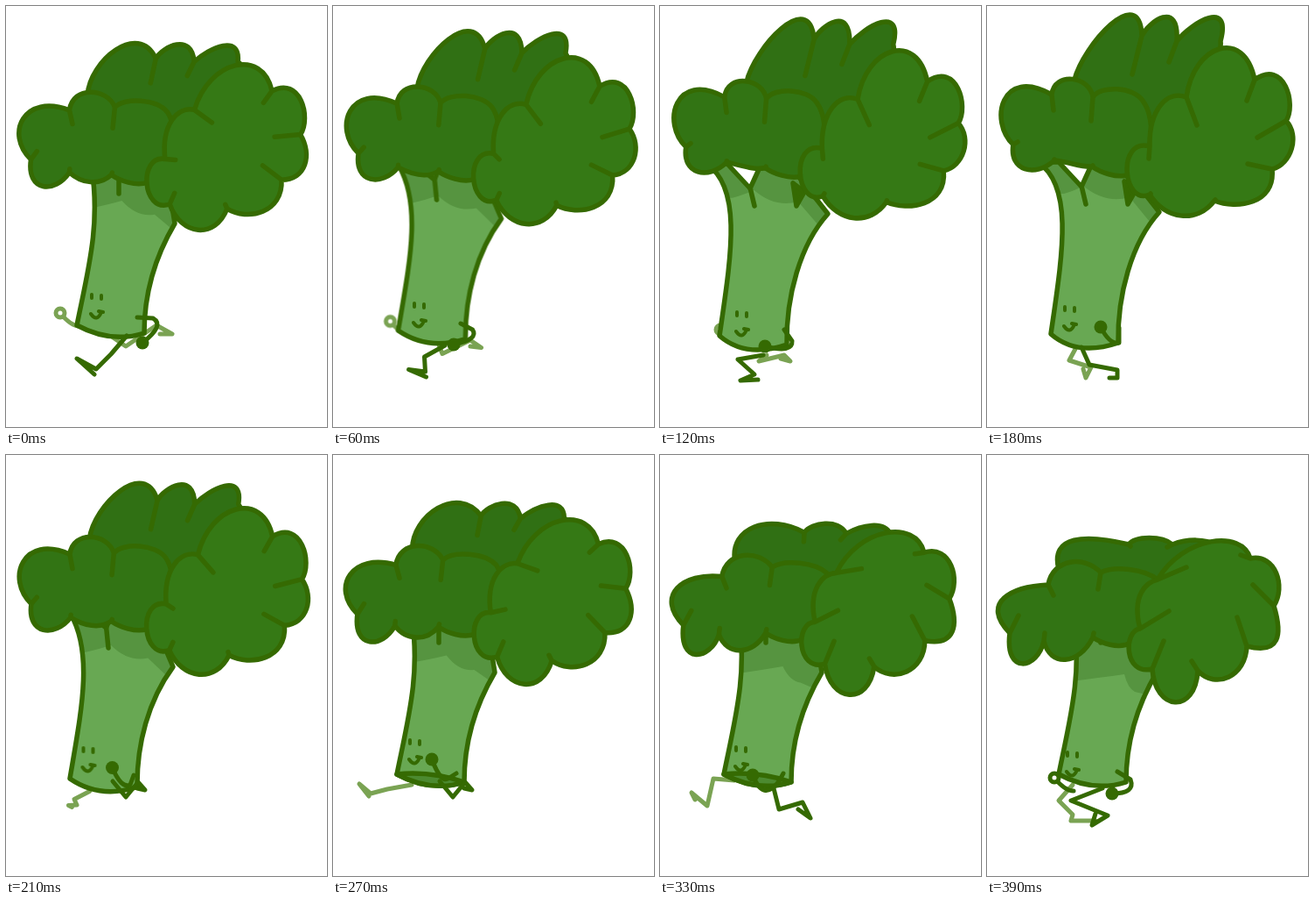
Animation of 367x480 px, one loop 0.42 s. Source, as an HTML page without scripts:

```html
<!DOCTYPE html>
<html lang="en">
<head>
<meta charset="utf-8">
<title>Running broccoli</title>
<style>
html, body { margin: 0; width: 100%; height: 100%; overflow: hidden; background: #fff; }
svg {
  display: block; width: 367px; height: 480px;
  /* How far the crown has dropped in each beat of the run: 0 up, 1 down. */
  --bounce: linear(.38 0% 14.2857%, .22 14.2857% 28.5714%, .06 28.5714% 42.8571%, 0 42.8571% 50%,
    .26 50% 64.2857%, .52 64.2857% 78.5714%, .8 78.5714% 92.8571%, 1 92.8571% 100%);
  /* How far the branches are pulled together: 0 spread, 1 closed. */
  --close: linear(1 0% 14.2857%, .5 14.2857% 28.5714%, 0 28.5714% 50%, .5 50% 64.2857%, 1 64.2857% 100%);
}
path {
  fill: none; stroke: #356a02; stroke-width: 5.5;
  stroke-linecap: round; stroke-linejoin: round;
}
path, .body { animation: 420ms step-end infinite; }

.crown path { animation-timing-function: var(--bounce); }
.back { animation-name: back; fill: #307014; }
.left { animation-name: left; fill: #327414; }
.right { animation-name: right; fill: #357915; }

.body { animation-name: sway; }
.stem, .fork { animation-timing-function: var(--close); }
.stem { animation-name: stem; }
.stem.fill { fill: #68a853; stroke: none; }
.fork { animation-name: fork; fill: #356a02; }
.shade { animation-name: shade; animation-timing-function: var(--bounce); fill: #569440; stroke: none; }
.base { animation-name: base; fill: #4c8a30; }

.limb { stroke-width: 5; }
.far { stroke: #7aa353; }
.leg { animation-name: leg; }
.far-leg { animation-name: far-leg; }
.arm { animation-name: arm; marker-end: url(#hand); }
.far-arm { animation-name: far-arm; marker-end: url(#ring); }
.face { animation-name: face; stroke-width: 4; }

/* Lobes run clockwise; each crease goes in and straight back out. */
@keyframes back {
  from { d: path("M100,84C110,45 175,-28 177,34l-11,44l11,-44C185,18 220,-8 217,40l-9,24l9,-24C235,18 280,-8 267,40C268,48 265,55 262,60L250,130H130Z"); }
  to { d: path("M82,130C72,92 112,90 162,102l2,2l-2,-2C170,92 200,92 212,102l-6,3l6,-3C230,95 250,96 262,102C275,100 292,104 300,116L300,150H130Z"); }
}
@keyframes left {
  from { d: path("M30,158l5,-3l-5,3C2,132 16,68 74,101l2,18l-2,-18C77,74 118,80 121,104l-2,27l2,-27C130,90 168,92 178,108C195,130 190,185 160,193C148,196 130,190 120,183l1,-1l-1,1C108,184 95,178 77,176l0,-1l0,1C55,196 25,188 30,158Z"); }
  to { d: path("M26,203l10,-20l-10,20C-8,168 28,150 70,148l6,12l-6,-12C75,118 112,114 130,134l-3,19l3,-19C145,126 180,130 195,142C205,160 190,200 165,214C150,222 130,214 121,208l1,-5l-1,5C105,240 72,242 65,212l1,-9l-1,9C58,244 20,252 26,203Z"); }
}
@keyframes right {
  from { d: path("M228,104l12,32l-12,-32C236,44 294,24 306,84l-9,24l9,-24C340,60 354,112 342,131l-33,19l33,-19C358,148 348,180 326,186l-28,-6l28,6C330,226 285,232 260,222l1,-1l-1,1C240,248 205,244 186,215l1,-1l-1,1C155,228 148,150 186,160l-1,14l1,-14C185,120 205,95 228,104Z"); }
  to { d: path("M195,142l33,-14l-33,14C225,92 292,85 301,118l-11,-4l11,4C330,112 342,150 328,172l-24,-24l24,24C338,205 335,228 297,218l-11,-33l11,33C296,252 262,268 241,246l-7,-11l7,11C238,296 192,292 189,244l13,-32l-13,32C156,252 156,200 175,198l33,-20l-33,20C165,160 182,145 195,142Z"); }
}
@keyframes stem {
  from { d: path("M58,178C100,205 86,285 73,374Q103,400 150,384C149,330 165,270 197,235L160,188L119,182L108,206L82,178Z"); }
  to { d: path("M90,185C100,250 86,300 73,364Q112,385 150,373C150,330 160,290 185,248L175,185L121,185L121,188L105,182Z"); }
}
@keyframes fork {
  from { d: path("M108,205L113,226M157,200L161,226L170,210Z"); }
  to { d: path("M121,186L121,214M170,180L170,185L172,182Z"); }
}
@keyframes shade {
  from { d: path("M50,214L88,214Q102,210 110,205Q135,226 163,218L186,246H220V150H50Z"); }
  to { d: path("M50,258L88,258Q120,254 148,250Q152,266 160,270L185,276H220V150H50Z"); }
}
@keyframes base {
  0%, to { opacity: 0; }
  64.2857% { opacity: 1; }
  92.8571% { opacity: 0; }
}

/* Two of the gaps between key poses hold a halfway pose. */
@keyframes sway {
  0%, to { transform: translateX(8px); animation-timing-function: steps(2); }
  28.5714% { transform: translate(-5px, 2px); }
  42.8571% { transform: none; }
  92.8571% { transform: translateX(9px); }
}
@keyframes face {
  0%, to { transform: none; animation-timing-function: steps(2); }
  28.5714% { transform: translate(-10px, 20px); }
  42.8571% { transform: translate(-9px, 14px); animation-timing-function: linear(0, 0 33.3333%, .5 33.3333%, .5); }
  64.2857% { transform: translate(-10px, -4px); }
  78.5714% { transform: translate(-11px, 4px); }
  92.8571% { transform: translate(-6px, 10px); }
}
/* hip, knee, ankle, toe, heel */
@keyframes leg {
  0%, to { d: path("M138,376l-18,21l-17,17l-22,-12l20,18"); animation-timing-function: steps(2); }
  28.5714% { d: path("M118,398l-29,5l19,17l-16,7l20,-1"); }
  42.8571% { d: path("M108,389l9,20l32,6v9h-9"); animation-timing-function: linear(0, 0 33.3333%, .5 33.3333%, .5); }
  64.2857% { d: path("M122,372l15,18l14,-17l8,9l-9,-2"); }
  78.5714% { d: path("M130,380l6,24l27,-8l9,18l-14,-10"); }
  92.8571% { d: path("M132,380l-36,14l42,17l-18,11l4,-13"); }
}
@keyframes far-leg {
  0%, to { d: path("M121,377l16,11l35,-24l18,10l-14,0"); animation-timing-function: steps(2); }
  28.5714% { d: path("M122,398l-9,7l29,-7l7,7l-11,-3"); }
  42.8571% { d: path("M101,391l-7,13l25,8l-6,12l-3,-10"); animation-timing-function: linear(0, 0 33.3333%, .5 33.3333%, .5); }
  64.2857% { d: path("M90,376l-28,5l-19,5l-13,-11l11,14"); }
  78.5714% { d: path("M85,371l-24,-2l-7,31l-18,-15l4,8"); }
  92.8571% { d: path("M98,376l-16,18l16,16l-2,7l28,0"); }
}
@keyframes arm {
  0%, to { d: path("M150,355L168,356Q182,364 156,384"); animation-timing-function: steps(2); }
  28.5714% { d: path("M142,369L151,382Q152,396 120,388"); }
  42.8571% { d: path("M151,367L151,384Q140,386 130,366"); animation-timing-function: linear(0, 0 33.3333%, .5 33.3333%, .5); }
  64.2857% { d: path("M141,363L133,368Q124,376 113,347"); }
  78.5714% { d: path("M141,363L136,372Q118,396 106,365"); }
  92.8571% { d: path("M149,361L164,370Q170,386 143,386"); }
}
@keyframes far-arm {
  0%, to { transform: none; animation-timing-function: steps(2); }
  28.5714% { transform: translate(7px, 19px); }
  42.8571% { transform: translate(28px, 0); }
  92.8571% { transform: translate(15px, 18px); stroke: #356a02; }
}
</style>
</head>
<body>
<svg viewBox="0 0 367 480">
  <defs>
    <marker id="hand" viewBox="-2 -2 4 4" markerWidth="4" markerHeight="4">
      <circle r="1.5" fill="#356a02"/>
    </marker>
    <marker id="ring" viewBox="-2 -2 4 4" markerWidth="4" markerHeight="4">
      <circle r="1" fill="#fff" stroke="context-stroke"/>
    </marker>
    <clipPath id="inside"><path class="stem"/></clipPath>
  </defs>
  <path class="limb far far-leg"/>
  <path class="limb far far-arm" d="M84,365Q74,365 62,350"/>
  <g class="body">
    <path class="stem fill"/>
    <g clip-path="url(#inside)"><path class="shade"/></g>
    <path class="stem"/>
    <path class="base" d="M73,364Q112,360 150,373Q112,385 73,364Z"/>
    <path class="fork"/>
  </g>
  <g class="crown">
    <path class="back"/>
    <path class="left"/>
    <path class="right"/>
  </g>
  <path class="limb leg"/>
  <path class="limb arm"/>
  <path class="face" d="M98,329v4M109,330v4M97,351Q104,361 109,349M106,348l5,1"/>
</svg>
</body>
</html>
```
